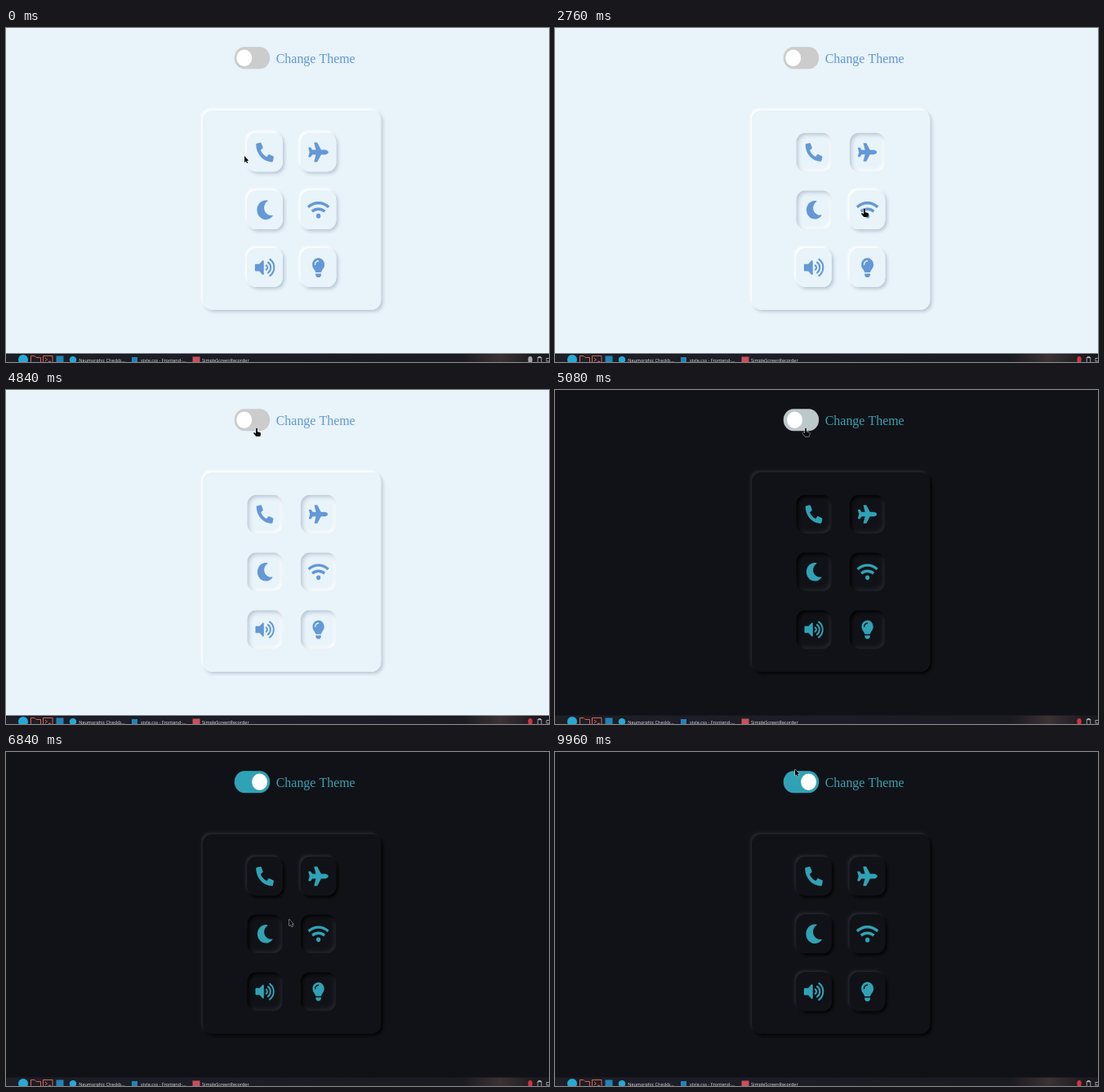
Animation, 665 px wide and 410 px high, one loop 10000 ms. Source, as an HTML page with a canvas:

```html
<!DOCTYPE html>
<html lang="en">
<head>
<meta charset="utf-8">
<title>Neumorphic checkboxes</title>
<style>
html, body { margin: 0; width: 100%; height: 100%; overflow: hidden; background: #e8f3fa; }
canvas { display: block; width: 665px; height: 410px; }
</style>
</head>
<body>
<canvas id="stage" width="665" height="410"></canvas>
<script>
const ctx = document.getElementById('stage').getContext('2d');
const LOOP = 10000, STEP = 40;
const SX = 0.725, SY = 0.794;

const LIGHT = { bg: '#e8f3fa', ink: '#6498d6', text: '#6297d3', hi: '#ffffff', lo: 'rgba(70,90,110,.3)' };
const DARK = { bg: '#111217', ink: '#30a2b5', text: '#3a9fb0', hi: '#24252b', lo: '#000000' };
const THEME_AT = 5080, SLIDE_AT = 5040, SLIDE_MS = 400;

// Icons on a 512-unit high grid; "line" parts are stroked.
const ICONS = {
  phone: { w: 512, fill: 'M497 362l-112-48a24 24 0 0 0-28 7l-50 60A371 371 0 0 1 131 204l60-49a24 24 0 0 0 7-28l-48-112A24 24 0 0 0 123 1l-104 24A24 24 0 0 0 0 48c0 256 208 464 464 464a24 24 0 0 0 23-19l24-104a24 24 0 0 0-14-27z' },
  plane: { w: 576, fill: 'M480 192H366L261 8A16 16 0 0 0 247 0h-66c-10 0-18 10-15 20L215 192H112l-43-58c-3-4-8-6-13-6H16C6 128-2 138 0 148L32 256 0 364C-2 374 6 384 16 384H56c5 0 10-2 13-6L112 320h103l-49 172c-3 10 5 20 15 20h66c6 0 11-3 14-8L366 320H480c35 0 96-29 96-64s-61-64-96-64z' },
  moon: { w: 512, fill: 'M283 512c79 0 151-36 199-95 7-9-1-21-12-19-124 23-238-72-238-197 0-72 39-139 102-175 9-5 7-20-4-22A258 258 0 0 0 283 0C142 0 27 115 27 256s115 256 256 256z' },
  wifi: { w: 640, fill: 'M256 416a64 64 0 0 1 128 0a64 64 0 0 1-128 0z', line: 'M22 183A455 455 0 0 1 618 183M134 297A299 299 0 0 1 506 297', width: 76, cap: 'butt' },
  sound: { w: 576, fill: 'M215 71L126 160H24A24 24 0 0 0 0 184V328A24 24 0 0 0 24 352H126L215 441A24 24 0 0 0 256 424V88A24 24 0 0 0 215 71Z', line: 'M435 40A258 258 0 0 1 435 472M381 120A161 161 0 0 1 381 392M326 200A63 63 0 0 1 326 312', width: 48, cap: 'round' },
  bulb: { w: 352, fill: 'M96 454c0 6 2 12 5 17l17 26a32 32 0 0 0 27 15h62a32 32 0 0 0 27-15l17-26c4-5 5-11 5-18V417H96zM0 176c0 44 16 85 44 116 16 19 42 58 52 92h160c10-34 36-73 52-92 28-31 44-72 44-116C352 78 273 0 175 0 73 0 0 83 0 176zm176-80c-44 0-80 36-80 80 0 9-7 16-16 16s-16-7-16-16c0-62 50-112 112-112 9 0 16 7 16 16s-7 16-16 16z' }
};
for (const icon of Object.values(ICONS)) {
  icon.fill = new Path2D(icon.fill);
  if (icon.line) icon.line = new Path2D(icon.line);
}

// Each button is pressed at "on" and released at "off".
const BUTTONS = [
  ['phone', 880, 5880], ['plane', 1720, 6560], ['moon', 2440, 7160],
  ['wifi', 2960, 7920], ['sound', 3520, 8680], ['bulb', 3960, 9320]
].map(([name, on, off], i) => ({
  icon: ICONS[name], on, off, x: 317.1 + 65.5 * (i % 2), y: 152.5 + 70.8 * Math.floor(i / 2)
}));
const BTN_W = 60 * SX, BTN_H = 60 * SY;
const TOGGLE = { x: 279.7, y: 23.2, w: 60 * SX, h: 34 * SY };

// Pointer stops: time, x, y.
const PATH = [
  [80, 292, 157], [440, 297, 147], [600, 297, 147], [720, 307, 151], [1080, 307, 151],
  [1640, 381, 152], [1880, 381, 152], [2280, 314, 221], [2480, 314, 221], [2760, 379, 222],
  [2960, 379, 222], [3320, 315, 291], [3560, 315, 291], [3880, 379, 293], [4080, 379, 293],
  [4520, 350, 86], [4560, 350, 86], [4840, 307, 47], [5120, 307, 47], [5640, 311, 150],
  [6120, 311, 150], [6360, 381, 152], [6600, 381, 152], [6840, 347, 205.5], [7040, 314, 222],
  [7240, 314, 222], [7640, 378, 226], [8080, 378, 226], [8160, 366, 225], [8560, 315, 290],
  [8720, 315, 290], [9120, 381, 293], [9360, 381, 293], [9800, 307, 33], [9920, 307, 33], [9960, 294, 21]
];
const ARROW = new Path2D('M0 0V8L1.8 6.4L3 9L4.2 8.5L3.1 6L5.2 5.8Z');
const HAND = new Path2D('M-1 .8A1 1 0 0 1 1 .8V4.2L4 5A1.2 1.2 0 0 1 5 6.2L4.4 10H-.8L-3.6 6.6A.9 .9 0 0 1-2.2 5.4L-1 6.4Z');

const lerp = (a, b, p) => a + (b - a) * p;
const clamp = p => Math.max(0, Math.min(1, p));
const smooth = p => p * p * (3 - 2 * p);

// The CSS "ease" curve.
function ease(x) {
  let lo = 0, hi = 1;
  for (let i = 0; i < 20; i++) {
    const s = (lo + hi) / 2, q = 1 - s;
    if (0.75 * q * s + s * s * s < x) lo = s; else hi = s;
  }
  const q = 1 - lo;
  return 0.3 * q * q * lo + 3 * q * lo * lo + lo * lo * lo;
}

function pointerAt(t) {
  const i = PATH.findIndex(k => k[0] >= t);
  if (i === 0) return PATH[0].slice(1);
  if (i < 0) return PATH[PATH.length - 1].slice(1);
  const a = PATH[i - 1], b = PATH[i], p = smooth((t - a[0]) / (b[0] - a[0]));
  return [lerp(a[1], b[1], p), lerp(a[2], b[2], p)];
}

function box(x, y, w, h, r) {
  const path = new Path2D();
  path.roundRect(x, y, w, h, { x: r * SX, y: r * SY });
  return path;
}

function setShadow(color, offset, blur) {
  ctx.shadowColor = color;
  ctx.shadowOffsetX = offset * SX;
  ctx.shadowOffsetY = offset * SY;
  ctx.shadowBlur = blur;
}

function raised(path, c) {
  ctx.save();
  ctx.fillStyle = c.bg;
  setShadow(c.lo, 3, 4);
  ctx.fill(path);
  setShadow(c.hi, -3, 3);
  ctx.fill(path);
  ctx.restore();
  ctx.fillStyle = c.bg;
  ctx.fill(path);
}

function sunken(path, c) {
  const ring = new Path2D();
  ring.rect(-50, -50, 765, 510);
  ring.addPath(path);
  ctx.save();
  ctx.clip(path);
  ctx.fillStyle = c.bg;
  setShadow(c.hi, -3, 4);
  ctx.fill(ring, 'evenodd');
  setShadow(c.lo, 3, 5);
  ctx.fill(ring, 'evenodd');
  ctx.restore();
}

function drawIcon(icon, x, y, size, color) {
  const k = size / 512;
  ctx.save();
  ctx.translate(x, y);
  ctx.scale(k * SX, k * SY);
  ctx.translate(-icon.w / 2, -256);
  ctx.fillStyle = ctx.strokeStyle = color;
  ctx.fill(icon.fill, 'evenodd');
  if (icon.line) {
    ctx.lineWidth = icon.width;
    ctx.lineCap = icon.cap;
    ctx.stroke(icon.line);
  }
  ctx.restore();
}

function label(text, x, y, font, color) {
  ctx.save();
  ctx.translate(x, y);
  ctx.scale(SX, SY);
  ctx.font = font;
  ctx.fillStyle = color;
  ctx.fillText(text, 0, 0);
  ctx.restore();
}

function disc(x, y, rx, ry, color) {
  ctx.fillStyle = color;
  ctx.beginPath();
  ctx.ellipse(x, y, rx, ry, 0, 0, Math.PI * 2);
  ctx.fill();
}

function drawToggle(t, c) {
  const p = ease(clamp((t - SLIDE_AT) / SLIDE_MS));
  const { x, y, w, h } = TOGGLE;
  ctx.fillStyle = `rgb(${lerp(204, 48, p)},${lerp(204, 162, p)},${lerp(204, 181, p)})`;
  ctx.fill(box(x, y, w, h, 17));
  disc(x + (16.6 + 26 * p) * SX, y + h / 2, 13 * SX, 13 * SY, '#fff');
  label('Change Theme', 330.7, 42.6, '22px "Liberation Serif", serif', c.text);
}

function drawTaskbar(t) {
  const g = ctx.createLinearGradient(0, 0, 665, 0);
  [[0, '#1d1e26'], [0.5, '#1c1d26'], [0.84, '#1b1b22'], [0.91, '#3b3233'], [0.97, '#1e1c22'], [1, '#19191f']]
    .forEach(([at, color]) => g.addColorStop(at, color));
  ctx.fillStyle = g;
  ctx.fillRect(0, 399.5, 665, 11);

  disc(21, 407, 6, 6, '#27a9d6');
  ctx.strokeStyle = '#d9604f';
  ctx.lineWidth = 1;
  ctx.stroke(new Path2D('M30.5 411V402.5H35L37 404.5H42.5V411'));
  ctx.stroke(new Path2D('M45.5 411V402.5H57V411M48 405L50.5 407L48 409M52 409.3H55'));
  ctx.fillStyle = '#2383b8';
  ctx.fillRect(61.5, 402.5, 9, 8);
  disc(82, 407.3, 4.2, 4.2, '#27a9d6');
  ctx.fillStyle = '#2383b8';
  ctx.fillRect(154, 404, 7, 6);
  ctx.fillStyle = '#c9505a';
  ctx.fillRect(228.5, 403.5, 9, 7);

  const font = '7.5px "Noto Sans", sans-serif';
  label('Neumorphic Checkb...', 89.3, 409.7, font, '#d2d3d8');
  label('style.css - Frontend-...', 165, 409.7, font, '#d2d3d8');
  label('SimpleScreenRecorder', 240, 409.7, font, '#d2d3d8');

  disc(642, 407, 2.7, 4, t < 240 ? '#a5a7ab' : '#d3343f');
  ctx.strokeStyle = '#b4b6ba';
  ctx.lineWidth = 0.8;
  ctx.strokeRect(651.2, 404.4, 4.6, 7);
  ctx.strokeRect(652.4, 403.4, 2.2, 1.4);
  ctx.strokeRect(662, 405.5, 4, 3.5);
}

function drawPointer(t) {
  const [x, y] = pointerAt(t);
  const inside = (l, top, w, h) => x >= l && x <= l + w && y >= top && y <= top + h;
  const hover = inside(TOGGLE.x, TOGGLE.y, TOGGLE.w, TOGGLE.h) ||
    BUTTONS.some(b => inside(b.x - BTN_W / 2, b.y - BTN_H / 2, BTN_W, BTN_H));
  const shape = hover ? HAND : ARROW;
  ctx.save();
  ctx.translate(x, y);
  ctx.lineJoin = 'round';
  ctx.lineWidth = 1;
  ctx.strokeStyle = 'rgba(255,255,255,.8)';
  ctx.stroke(shape);
  ctx.fillStyle = '#08080a';
  ctx.fill(shape);
  ctx.restore();
}

function draw(t) {
  const c = t < THEME_AT ? LIGHT : DARK;
  ctx.fillStyle = c.bg;
  ctx.fillRect(0, 0, 665, 410);
  drawToggle(t, c);
  raised(box(241.2, 101.2, 218, 244.5, 15), c);
  for (const b of BUTTONS) {
    const pressed = t >= b.on && t < b.off;
    (pressed ? sunken : raised)(box(b.x - BTN_W / 2, b.y - BTN_H / 2, BTN_W, BTN_H, 15), c);
    drawIcon(b.icon, b.x, b.y, pressed ? 28.5 : 30, c.ink);
  }
  drawTaskbar(t);
  drawPointer(t);
}

const start = performance.now();
function tick() {
  const t = (performance.now() - start) % LOOP;
  draw(Math.floor(t / STEP) * STEP);
  requestAnimationFrame(tick);
}
tick();
</script>
</body>
</html>
```
